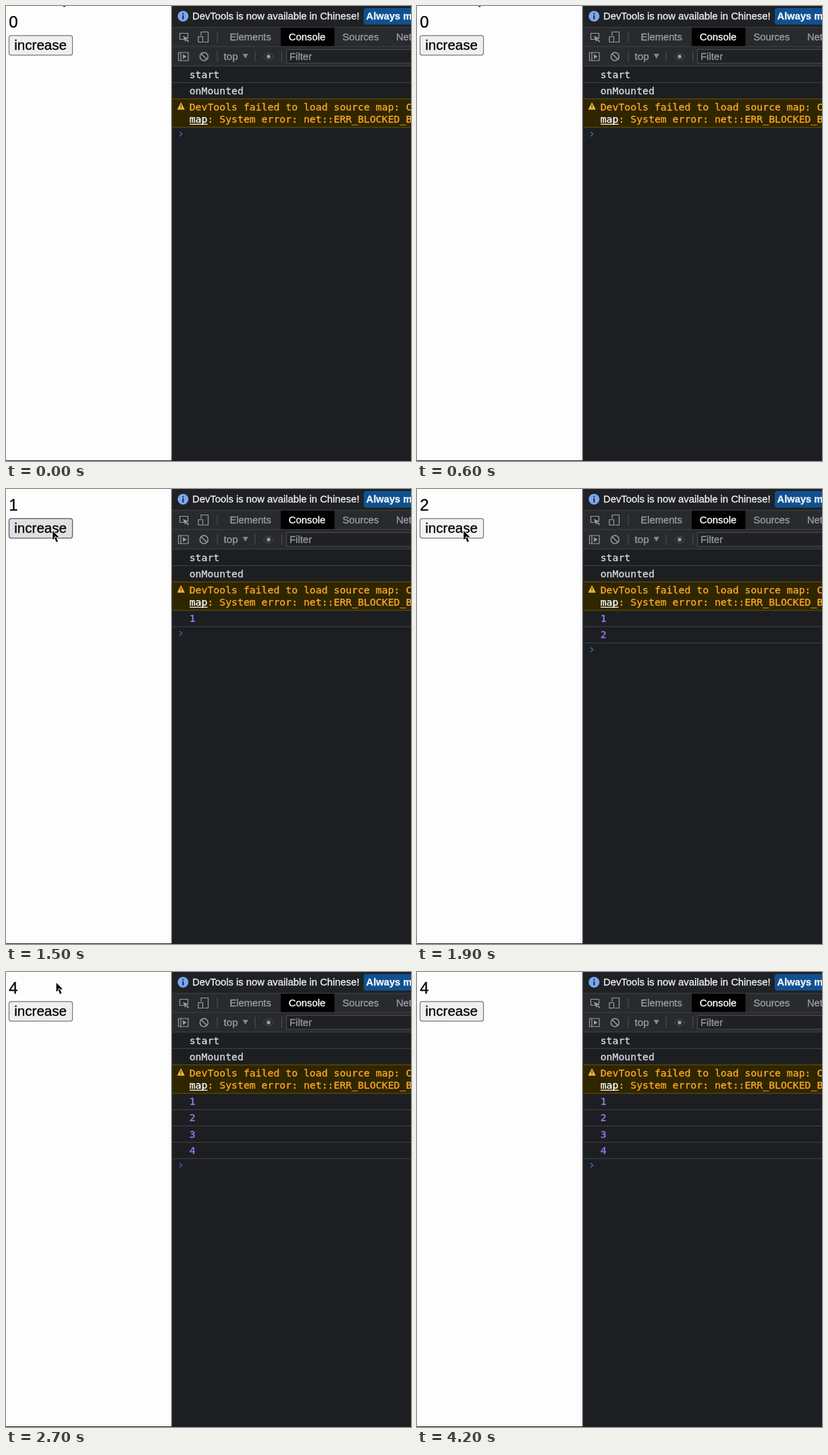
Recreate the animation shown at these times as an HTML page with a canvas. Size 600 by 675 pixels, loop 4.3 s.

```html
<!DOCTYPE html>
<html lang="en">
<head>
<meta charset="utf-8">
<title>Counter and console</title>
<style>
html, body { margin: 0; width: 100%; height: 100%; overflow: hidden; background: #1d1e21; }
canvas { display: block; width: 600px; height: 675px; }
</style>
</head>
<body>
<canvas id="stage" width="600" height="675"></canvas>
<script>
const ctx = document.getElementById('stage').getContext('2d');
const LOOP = 4300, STEP = 100;
const FIRST_CLICK = 1400, CLICK_GAP = 300, CLICKS = 4;
const SPLIT = 245.2, HAIR = 1.2, ROW = 24.2;
const SANS = '"Liberation Sans", Arial, sans-serif';
const MONO = '"DejaVu Sans Mono", Menlo, monospace';
const GREY = '#9aa0a6', RULE = '#3b3d41', BAR = '#292a2d', DARK = '#1d1e21';
const AMBER = '#ffa826', WARN_BG = '#2f2600', WARN_RULE = '#5f4c00';

function rect(x, y, w, h, color) {
  ctx.fillStyle = color;
  ctx.fillRect(x, y, w, h);
}

const panel = (y, h, color) => rect(SPLIT, y, 600 - SPLIT, h, color);
const rule = (y, color = RULE) => panel(y, HAIR, color);
const divider = (x, y) => rect(x, y, HAIR, 16, '#494c50');

function box(x, y, w, h, color) {
  ctx.strokeStyle = color;
  ctx.lineWidth = HAIR;
  ctx.strokeRect(x, y, w, h);
}

function round(x, y, w, h, r, fill, edge) {
  ctx.beginPath();
  ctx.roundRect(x, y, w, h, r);
  ctx.fillStyle = fill;
  ctx.fill();
  if (!edge) return;
  ctx.strokeStyle = edge;
  ctx.lineWidth = HAIR;
  ctx.stroke();
}

// The thin stroke gives the slightly heavy look of smoothed glyphs.
function text(str, x, y, color, size = 14.7, font = SANS, weight = '') {
  ctx.font = `${weight} ${size}px ${font}`;
  ctx.fillStyle = ctx.strokeStyle = color;
  ctx.lineWidth = 0.3;
  ctx.lineJoin = 'round';
  ctx.fillText(str, x, y);
  ctx.strokeText(str, x, y);
}

const mono = (str, y, color) => text(str, 271.7, y, color, 14.8, MONO);

function circle(x, y, r) {
  ctx.beginPath();
  ctx.arc(x, y, r, 0, Math.PI * 2);
}

function disc(x, y, r, color) {
  circle(x, y, r);
  ctx.fillStyle = color;
  ctx.fill();
}

// Triangle with its tip at the given angle, w long and h wide.
function triangle(x, y, w, h, angle, color) {
  ctx.save();
  ctx.translate(x, y);
  ctx.rotate(angle);
  ctx.beginPath();
  ctx.moveTo(w / 2, 0);
  ctx.lineTo(-w / 2, h / 2);
  ctx.lineTo(-w / 2, -h / 2);
  ctx.fillStyle = color;
  ctx.fill();
  ctx.restore();
}

// Pointer with its tip at x, y and its tail along the angle.
function arrow(x, y, scale, angle, color, outline) {
  ctx.save();
  ctx.translate(x, y);
  ctx.rotate(angle);
  ctx.scale(scale, scale);
  ctx.beginPath();
  ctx.moveTo(0, 0);
  ctx.lineTo(12.2, 5);
  ctx.lineTo(10.8, 0);
  ctx.lineTo(12.2, -5);
  ctx.closePath();
  ctx.rect(9.5, -1.3, 8, 2.6);
  ctx.lineJoin = 'round';
  if (outline) {
    ctx.strokeStyle = outline;
    ctx.lineWidth = 2;
    ctx.stroke();
  }
  ctx.fillStyle = color;
  ctx.fill();
  ctx.restore();
}

function drawPage(count, state) {
  rect(0, 0, SPLIT, 674, '#fefdfe');
  text(count, 4.3, 32, '#000', 24);
  const fill = { idle: '#efefef', hover: '#e0e0e2', active: '#f3f3f4' }[state];
  round(4.5, 43.8, 94, 29, 3, fill, state === 'hover' ? '#55555a' : '#767676');
  text('increase', 12.2, 65, '#000', 20.6);
}

function drawInfobar() {
  panel(0, 31, '#202124');
  disc(262.3, 15.2, 8, '#7ba7f0');
  rect(261.3, 10.5, 2, 2, '#202124');
  rect(261.3, 13.8, 2, 6, '#202124');
  text('DevTools is now available in Chinese!', 276, 20, '#f1f3f4', 14.8);
  round(530, 3, 90, 24.5, 4, '#0f5190');
  text('Always match', 533.6, 20, '#f1f5fb', 14.7, SANS, 'bold');
}

function drawTabs() {
  panel(31, 29, BAR);
  rule(31);
  box(257.5, 40.5, 12, 9, GREY);
  arrow(262, 44.5, 0.95, Math.PI / 4, BAR);
  arrow(262, 44.5, 0.7, Math.PI / 4, GREY);
  box(289, 38.5, 10.5, 15, GREY);
  rect(284, 44, 9, 11, BAR);
  box(285, 45.5, 6.5, 8, GREY);
  divider(312.5, 38);
  rect(407, 32, 79.5, 28, '#000');
  text('Elements', 331.5, 51, GREY);
  text('Console', 418.7, 51, '#fff', 14.9);
  text('Sources', 498.5, 51, GREY);
  text('Network', 578, 51, GREY);
}

function drawToolbar() {
  panel(60, 29, BAR);
  rule(59.5);
  rule(88.5);
  box(255.5, 69, 14.5, 12, GREY);
  rect(258.4, 69, HAIR, 12, GREY);
  triangle(264.8, 75, 5.5, 7, 0, GREY);

  circle(293.3, 75, 6);
  ctx.moveTo(289.1, 70.8);
  ctx.lineTo(297.5, 79.2);
  ctx.strokeStyle = GREY;
  ctx.lineWidth = 1.5;
  ctx.stroke();

  divider(312.5, 67);
  text('top', 322.6, 80, GREY, 15.2);
  triangle(354.7, 74.5, 7, 8, Math.PI / 2, '#85898e');
  divider(368.5, 67);

  ctx.beginPath();
  ctx.moveTo(381, 75);
  ctx.quadraticCurveTo(389, 64.5, 397, 75);
  ctx.quadraticCurveTo(389, 85.5, 381, 75);
  ctx.strokeStyle = GREY;
  ctx.stroke();
  disc(389, 75, 2.7, GREY);
  divider(408, 67);
  round(415.5, 64.5, 200, 20.5, 1, '#202124', '#4a4d51');
  text('Filter', 420, 80, '#969ba1', 14.9);
}

function drawWarning(top, height) {
  panel(top, height, WARN_BG);
  rule(top - 0.2, WARN_RULE);
  triangle(259.2, top + 10.8, 11, 11.2, -Math.PI / 2, '#f5b83d');
  rect(258.6, top + 9, HAIR, 3.6, WARN_BG);
  rect(258.6, top + 13.4, HAIR, HAIR, WARN_BG);
  const first = top + 17.6, second = first + 18;
  mono('DevTools failed to load source map: Could', first, AMBER);
  mono('map', second, '#fff');
  rect(272, second + 1.8, 26.6, HAIR, '#fff');
  mono('   : System error: net::ERR_BLOCKED_BY_CLIENT', second, AMBER);
}

function drawConsole(count) {
  let y = 89;
  const row = (str, color) => {
    mono(str, y + 17.6, color);
    y += ROW;
    rule(y - 0.2);
  };
  row('start', '#d8dce1');
  row('onMounted', '#d8dce1');
  drawWarning(y, 42.2);
  y += 42.2;
  rule(y - 0.2, WARN_RULE);
  for (let i = 1; i <= count; i++) row(i, '#9980ff');

  ctx.beginPath();
  ctx.moveTo(257, y + 7);
  ctx.lineTo(260.8, y + 10.4);
  ctx.lineTo(257, y + 13.8);
  ctx.strokeStyle = '#2f66bd';
  ctx.lineWidth = 1.5;
  ctx.stroke();
}

// Eased progress from 0 to 1 between two times.
function ease(t, from, to) {
  const k = Math.min(1, Math.max(0, (t - from) / (to - from)));
  return k * k * (3 - 2 * k);
}

function cursorAt(t) {
  const drift = ease(t, 0, 200), enter = ease(t, 600, 1000), leave = ease(t, 2600, 2800);
  return [
    80 + 6.5 * drift - 17.5 * enter + 11 * leave,
    -15 + 77 * enter - 92 * leave
  ];
}

function render(ms) {
  const t = Math.floor((ms % LOOP) / STEP) * STEP;
  const clicks = Math.floor((t - FIRST_CLICK) / CLICK_GAP) + 1;
  const count = Math.min(CLICKS, Math.max(0, clicks));
  const next = FIRST_CLICK + count * CLICK_GAP;
  const pressed = count < CLICKS && t >= next - STEP;
  const [x, y] = cursorAt(t);
  const hovered = y > 44 && y < 73;

  rect(0, 0, 600, 675, DARK);
  drawPage(count, pressed ? 'active' : hovered ? 'hover' : 'idle');
  drawInfobar();
  drawTabs();
  drawToolbar();
  drawConsole(count);
  rect(SPLIT, 0, HAIR, 674, '#494c50');
  arrow(x, y, 1, Math.PI * 3 / 8, '#000', '#fff');
}

const start = performance.now();
function tick() {
  render(performance.now() - start);
  requestAnimationFrame(tick);
}
tick();
</script>
</body>
</html>
```
